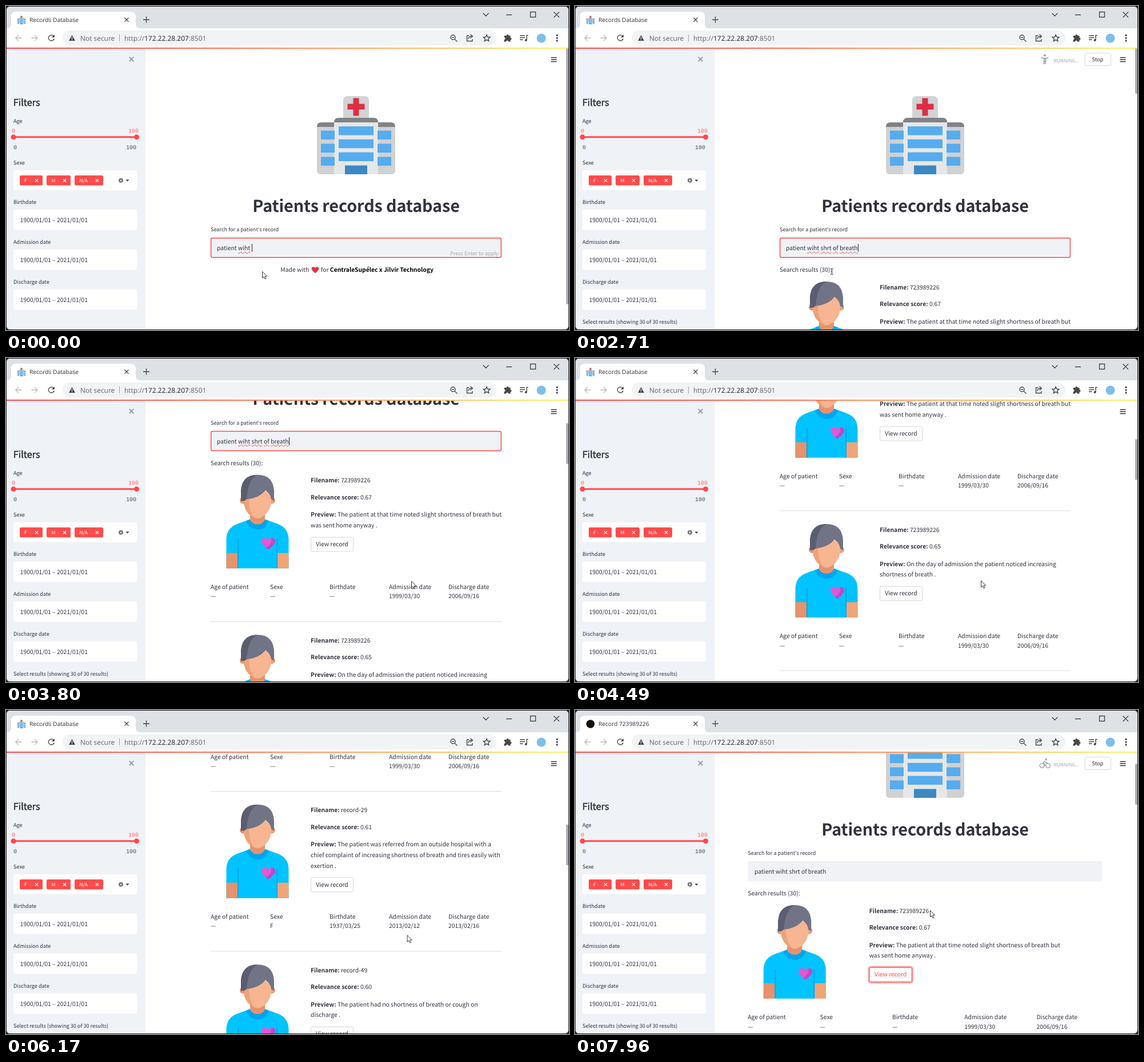
Write an HTML page that moves like this. It is 985x568 px and loops after 8000 ms.

```html
<!DOCTYPE html>
<html lang="en">
<head>
<meta charset="utf-8">
<title>Records Database</title>
<style>
@property --y { syntax: "<number>"; inherits: true; initial-value: 0; }
html, body { margin: 0; width: 100%; height: 100%; overflow: hidden; background: #25252d; }
svg { display: block; }
#stage {
  --y: 0;
  font: 10.35px "Noto Sans CJK JP", "Noto Sans CJK SC", "Noto Sans", sans-serif;
  fill: #31333f;
  text-rendering: geometricPrecision;
  animation: scroll 8s linear infinite;
}
#page { transform: translateY(calc(var(--y) * -1px)); }
.thumb { fill: #a9abb0; transform: translateY(calc(var(--y) * .144px)); }
#pointer { animation: point 8s linear infinite; }
.b { font-weight: 700; }
.semi { stroke: #31333f; stroke-width: .5; }
.small { font-size: 9.13px; }
.tag { font-size: 8.6px; font-weight: 500; fill: #fff; }
.mono { font: 10.1px "Liberation Mono", monospace; opacity: .85; }
.ui { font-family: "Open Sans", "Noto Sans", sans-serif; }
.red { fill: #ff4b4b; }
.line { fill: none; stroke: #45484d; stroke-width: 1.4; }
.typed { font: 10.35px/20px "Noto Sans CJK JP", "Noto Sans CJK SC", "Noto Sans", sans-serif; color: #31333f; white-space: pre; }
.typed u { text-decoration: underline wavy #e5473f .6px; text-underline-offset: 1.5px; text-decoration-skip-ink: none; }
.typed i { display: inline-block; width: 1px; height: 14px; margin-right: -1px; vertical-align: -3px; background: #222; }
@keyframes scroll {
  0%, 39% { --y: 0; }
  47.5% { --y: 278; }
  53.625%, 54.5% { --y: 378; }
  55.25% { --y: 420; }
  56.125% { --y: 472; }
  59.5%, 63% { --y: 566; }
  67.125% { --y: 843; }
  73%, 76.5% { --y: 945; }
  83.25% { --y: 236; }
  86.75%, 100% { --y: 141; }
}
@keyframes point {
  0%, 34.5% { transform: translate(448px, 465px); }
  41% { transform: translate(700px, 394px); }
  47.5% { transform: translate(709px, 391px); }
  56%, 74% { transform: translate(710px, 390px); }
  83.25% { transform: translate(685px, 403px); }
  86.75% { transform: translate(670px, 413px); }
  91%, 93.5% { transform: translate(572px, 466px); }
  99.4%, 100% { transform: translate(621px, 351px); }
}
</style>
</head>
<body>
<svg id="stage" width="985" height="568" viewBox="0 0 985 568">
  <defs>
    <linearGradient id="rainbow"><stop stop-color="#ff4b4b"/><stop offset=".35" stop-color="#ff6a58"/><stop offset="1" stop-color="#fff36b"/></linearGradient>
    <clipPath id="window"><rect x="1" y="1" width="983" height="566" rx="6"/></clipPath>
    <clipPath id="view"><rect x="244" y="74.5" width="740" height="492.5"/></clipPath>
    <g id="hospital">
      <path fill="#d1d3d4" d="M46 50V8q0-8 8-8h29q8 0 8 8v42z"/>
      <path fill="#dd2e44" d="M63.500 3.500h10v10h10v10h-10v11h-10v-11h-10v-10h10z"/>
      <path fill="#cfd1d3" d="M0 53h137v77q0 7-7 7H7q-7 0-7-7z"/>
      <path fill="#808285" d="M0 54q0-8 8-8h121q8 0 8 8z"/>
      <path fill="#e6e7e8" d="M30 46h77v91H30z"/>
      <path fill="#808285" d="M30 46q0-8 8-8h61q8 0 8 8z"/>
      <path fill="#55acee" d="M7 60.500h24v15.500H7zm0 23h24V99H7zm0 23h24V122H7zM106 60.500h24v15.500h-24zm0 23h24V99h-24zm0 23h24V122h-24zM38 53h61v15.500H38zm0 22.700h61v15.500H38zm0 22.700h61V114H38z"/>
      <path fill="#3b88c3" d="M49 121.500h39V137H49z"/>
    </g>
    <g id="avatar">
      <path fill="#00c3ff" d="M-54.500 164v-50Q-54.500 93-35 86L-13 78h26L35 86Q54.500 93 54.500 114v50z"/>
      <path fill="#00a4ef" d="M-20 81L-13 78h26l7 3Q14 96 0 96T-20 81zM-35 112h2v52h-2zM33 112h2v52h-2z"/>
      <path fill="#e5936c" d="M-54.500 137h19.500v27h-19.500zM-13 58h26v21Q9 87 0 87T-13 79z"/>
      <path fill="#f0a577" d="M35 137h19.500v27H35z"/>
      <circle cx="-25" cy="45" r="6" fill="#e8956d"/>
      <circle cx="25" cy="45" r="6" fill="#f0a073"/>
      <path fill="#f7b591" d="M-24 28h48v20Q22 66 8 74Q0 79-8 74Q-22 66-24 48z"/>
      <path fill="#eda27a" d="M-24 30h9v18Q-13 68-4 76Q-22 69-24 48z"/>
      <path fill="#707486" d="M-29 46V28Q-27 0 0 0T29 28V46L24 43Q23 33 14 27Q3 41-20 43L-24 46z"/>
      <path fill="#5a5e70" d="M-29 46V28Q-27 0 0 0Q-17 8-19 43L-24 46z"/>
      <path fill="#e457d0" d="M19 131Q3 119 8 113Q14 108 19 114Q24 108 30 113Q35 119 19 131z"/>
      <path fill="#b84bcb" d="M19 131Q35 119 30 113Q27 110 24 111Q26 121 15 128z"/>
    </g>
  </defs>

  <rect width="985" height="568" fill="#25252d"/>
  <g clip-path="url(#window)">
    <rect width="985" height="568" fill="#fff"/>

    <!-- browser frame -->
    <rect width="985" height="39" fill="#dee1e6"/>
    <path fill="#fff" d="M2 39q7 0 7-7V18q0-8 8-8h202q8 0 8 8v14q0 7 7 7z"/>
    <g data-on="0-7750">
      <use href="#hospital" transform="translate(19.500 17) scale(.11)"/>
      <text class="ui" x="41" y="28" font-size="10.250">Records Database</text>
    </g>
    <g data-on="7750-8000">
      <circle cx="27" cy="24.500" r="7.300" fill="#111"/>
      <text class="ui" x="41" y="28" font-size="10.250">Record 723989226</text>
    </g>
    <path class="line" d="M207.500 20.500l7 7m0-7l-7 7M240 24h11m-5.500-5.500v11"/>
    <path class="line" stroke-width="1.100" d="M834.500 12.500l5 5 5-5M875 15.500h10M917.500 10.500h9v9h-9zM958.500 10.500l9.500 9.500m0-9.500l-9.500 9.500"/>
    <path class="line" style="stroke:#b8bbbf" d="M27.500 56H17m5-5l-5 5 5 5M44.500 56H55m-5-5l5 5-5 5"/>
    <path class="line" d="M83 52.500a5 5 0 1 0 1.200 4.500"/>
    <path fill="#45484d" d="M85 50v5h-5z"/>
    <rect x="99" y="43" width="759" height="26" rx="13" fill="#f1f3f4"/>
    <path fill="#45484d" d="M115.500 51l5.500 10h-11z"/>
    <path stroke="#fff" stroke-width="1.200" d="M115.500 54.500v3m0 1v1.200"/>
    <g class="ui" font-size="11.950" fill="#5f6368">
      <text x="130" y="60.500">Not secure</text>
      <path stroke="#9aa0a6" d="M198.500 50v12"/>
      <text x="207" y="60.500">http://<tspan fill="#202124">172.22.28.207</tspan>:8501</text>
    </g>
    <g class="line" stroke-width="1.300">
      <circle cx="782" cy="55" r="4"/><path d="M785 58l4.500 4.500M780 55h4"/>
      <path d="M810 52h-3.500v9.500h9.500V58M809 58q0-5 6-5m-2.500-3l4 3-4 3.500"/>
      <path d="M841 50.500l1.700 3.800 4.200.4-3.200 2.800 1 4-3.700-2.200-3.700 2.200 1-4-3.200-2.800 4.200-.4z"/>
      <path d="M899 52h9m-9 3.500h9m-9 3.500h5.500M911 60v-8.500h2.500"/>
    </g>
    <circle cx="909.500" cy="60" r="2" fill="#45484d"/>
    <path fill="#45484d" d="M872 52h3.500a2 2 0 1 1 4 0h3v3.500a2 2 0 1 1 0 4V62.500H879a2 2 0 0 0-4 0h-3.500V59a2 2 0 0 0 0-4z"/>
    <circle cx="936.500" cy="56.500" r="8" fill="#7cbfe9"/>
    <path fill="#45484d" d="M962.500 50h3v3h-3zm0 4.700h3v3h-3zm0 4.700h3v3h-3z"/>

    <!-- sidebar -->
    <rect y="74" width="244" height="494" fill="#eff2f7"/>
    <path class="line" style="stroke:#9da0a8;stroke-width:2" d="M215.800 89.500l7.500 7.500m0-7.500l-7.500 7.500"/>
    <text class="semi" x="12.700" y="175" font-size="16.300">Filters</text>
    <text class="small" x="13" y="205">Age</text>
    <g class="mono">
      <text class="red" x="10" y="221.500">0</text><text class="red" x="214" y="221.500">100</text>
      <text x="13" y="250.500">0</text><text x="210" y="250.500">100</text>
    </g>
    <path stroke="#ff4b4b" stroke-width="3" d="M13 229.700h215.500"/>
    <circle class="red" cx="13" cy="229.700" r="4.500"/><circle class="red" cx="228.500" cy="229.700" r="4.500"/>
    <text class="small" x="13" y="278">Sexe</text>
    <rect x="13" y="288" width="216" height="35" rx="3" fill="#fff"/>
    <g id="tags"></g>
    <circle cx="201" cy="305.800" r="4" fill="#74767f"/>
    <path stroke="#fff" d="M199.500 304.300l3 3m0-3l-3 3"/>
    <path d="M209.500 304.500h6l-3 3.200z"/>
    <g id="dates"></g>
    <text class="small" data-on="1880-8000" x="13" y="556.500">Select results (showing 30 of 30 results)</text>

    <!-- scrolling page -->
    <g clip-path="url(#view)"><g id="page"></g></g>

    <rect y="73" width="985" height="2" fill="url(#rainbow)"/>
    <path class="line" style="stroke:#31333f" d="M953.500 90.500h10m-10 3.500h10m-10 3.500h10"/>
    <g data-on="1340-2780 7820-8000">
      <g id="poses" fill="none" stroke="#9a9ca3" stroke-width="1.700">
        <g><circle cx="825" cy="87" r="1.200"/><path d="M817 92l4-2h3l-2 5 3 3-2 4m-1-7l-2 4h-4m8-9l2 3h3"/></g>
        <g><circle cx="822" cy="86.500" r="1.200"/><path d="M815.500 90.500l4.500 1h4l4.500-1M820.700 91v11m2.600-11v11M820.700 97h2.600"/></g>
        <g stroke-width="1.300"><circle cx="817" cy="97.500" r="3.800"/><circle cx="827.500" cy="97.500" r="3.800"/><circle cx="824" cy="86.500" r="1.200"/><path d="M827 93h-3l-2-3-3 2.500 3 2.500v4"/></g>
      </g>
      <text x="837.500" y="99" font-size="8.400" fill="#a5a7ae">RUNNING...</text>
      <rect x="892" y="82.500" width="45.500" height="22" rx="2.500" fill="#fff" stroke="#d6d7db"/>
      <text class="small" x="904.500" y="97">Stop</text>
    </g>
    <rect class="thumb" data-on="0-1880" x="980" y="74" width="4" height="449" rx="2"/>
    <rect class="thumb" data-on="1880-2780" x="980" y="74" width="4" height="80" rx="2"/>
    <rect class="thumb" data-on="2780-8000" x="980" y="74" width="4" height="72" rx="2"/>
  </g>

  <g id="pointer">
    <path data-on="0-1880 2780-8000" fill="#fff" stroke="#222" stroke-width=".9" d="M.500.500V12l2.700-2.500 2 4.300 1.900-.9-2-4.100h3.600z"/>
    <path data-on="1880-2780" fill="none" stroke="#222" d="M-1-4.500h1.500l1 1 1-1H4M1.500-3.500v8M-1 5.500h1.500l1-1 1 1H4"/>
  </g>
</svg>

<script>
const LOOP = 8000;
const PHRASE = "patient wiht shrt of breath";
const START = 13;
const $ = id => document.getElementById(id);

const text = (x, y, s, cls = "") => `<text x="${x}" y="${y}" class="${cls}">${s}</text>`;
const bold = s => `<tspan class="b">${s}</tspan>`;

const records = [
  ["723989226", "0.67", ["The patient at that time noted slight shortness of breath but", "was sent home anyway ."],
    ["—", "—", "—", "1999/03/30", "2006/09/16"]],
  ["723989226", "0.65", ["On the day of admission the patient noticed increasing", "shortness of breath ."],
    ["—", "—", "—", "1999/03/30", "2006/09/16"]],
  ["record-29", "0.61", ["The patient was referred from an outside hospital with a", "chief complaint of increasing shortness of breath and tires easily with", "exertion ."],
    ["—", "F", "1937/03/25", "2013/02/12", "2013/02/16"]],
  ["record-49", "0.60", ["The patient had no shortness of breath or cough on", "discharge ."],
    ["—", "M", "1951/08/04", "2012/05/19", "2012/05/23"]],
];
const fields = ["Age of patient", "Sexe", "Birthdate", "Admission date", "Discharge date"];

function button(x, y, state = "") {
  const hot = state !== "";
  const ring = state === "focus"
    ? `<rect x="${x - 1}" y="${y - 1}" width="77" height="28" rx="4" fill="none" stroke="#ff4b4b" stroke-opacity=".5" stroke-width="2.500"/>` : "";
  return ring +
    `<rect x="${x + .5}" y="${y + .5}" width="74" height="25" rx="2.500" fill="#fff" stroke="${hot ? "#ff4b4b" : "#d6d7db"}"/>` +
    text(x + 9.3, y + 16.3, "View record", hot ? "red" : "");
}

function record([file, score, lines, values], i, { left, width, pitch, tx }) {
  const y = 496.5 + 280.4 * i;
  const buttonY = y + 58 + 18.7 * lines.length;
  return `<use href="#avatar" x="${left + 82}" y="${y - 13.5}" data-on="2710-8000"/>` +
    text(tx, y, bold("Filename:") + " " + file) +
    text(tx, y + 29.7, bold("Relevance score:") + " " + score) +
    lines.map((s, n) => text(tx, y + 60 + 18.7 * n, n ? s : bold("Preview:") + " " + s)).join("") +
    button(tx, buttonY) +
    fields.map((f, n) => text(left + pitch * n, y + 186.7, f) + text(left + pitch * n, y + 203, values[n])).join("") +
    `<path stroke="#d9dade" d="M${left} ${y + 243.7}h${width}"/>`;
}

const results = layout =>
  text(layout.left, 466, "Search results (30):") +
  records.map((r, i) => record(r, i, layout)).join("");

const search = ({ left, width }) =>
  text(left, 395, "Search for a patient's record", "small") +
  `<rect x="${left}" y="406" width="${width}" height="35.500" rx="3" fill="#f0f2f6"/>`;

const narrow = { left: 358, width: 509, pitch: 104, tx: 533 };
const wide = { left: 302.3, width: 619.7, pitch: 126.3, tx: 514.7 };

$("page").innerHTML = `
  <use href="#hospital" x="544" y="158"/>
  <text class="b" x="612.500" y="360.500" font-size="28.750" letter-spacing="-.1" text-anchor="middle">Patients records database</text>
  <g data-on="0-7820">
    ${search(narrow)}
    <rect data-on="0-7400" x="358.700" y="406.700" width="507.600" height="34" rx="2.500" fill="none" stroke="#ff4b4b" stroke-width="1.500"/>
    <foreignObject x="369" y="413.500" width="300" height="22"><div class="typed" id="typed"></div></foreignObject>
    <text data-on="0-1340" x="861.500" y="437" font-size="9.130" fill="#a3a5ac" text-anchor="end">Press Enter to apply</text>
  </g>
  <g data-on="0-1880">
    ${text(480.3, 466, "Made with")}
    <path fill="#e8323f" d="M541 468.500Q532 461.500 535.500 458Q538.500 456 541 459Q543.500 456 546.500 458Q550 461.500 541 468.500z"/>
    <text x="551" y="466">for <tspan class="b" fill="#000">CentraleSupélec x Jilvir Technology</tspan></text>
  </g>
  <g data-on="1880-7820">
    ${results(narrow)}
    <g data-on="7250-7400">${button(533, 592, "hover")}</g>
    <g data-on="7400-7820">${button(533, 592, "focus")}</g>
  </g>
  <g data-on="7820-8000">
    ${search(wide)}${text(314, 428, PHRASE)}
    ${results(wide)}${button(wide.tx, 592, "focus")}
  </g>`;

$("tags").innerHTML = [["F", 24, 40, 8], ["M", 71, 42, 8.5], ["N/A", 120, 50, 8.5]].map(([s, x, w, pad]) =>
  `<rect class="red" x="${x}" y="297" width="${w}" height="17.500" rx="2.500"/>` + text(x + pad, 309, s, "tag") +
  `<path stroke="#fff" stroke-width="1.300" d="M${x + w - 13} 303.200l5 5m0-5l-5 5"/>`).join("");

$("dates").innerHTML = ["Birthdate", "Admission date", "Discharge date"].map((s, i) => {
  const y = 347 + 69.8 * i;
  return text(13, y, s, "small") +
    `<rect x="13" y="${y + 10}" width="216" height="35.800" rx="3" fill="#fff"/>` +
    text(24.8, y + 32, "1900/01/01 – 2021/01/01");
}).join("");

// Elements with data-on="from-to ..." are shown only in those spans of the loop.
const timed = [...document.querySelectorAll("[data-on]")].map(el => ({
  el, spans: el.dataset.on.split(" ").map(s => s.split("-").map(Number)),
}));
const poses = [...$("poses").children];
const show = (el, on) => { el.style.display = on ? "" : "none"; };

function keystrokes(t) {
  if (t < 70) return 0;
  if (t < 940) return Math.min(11, Math.floor((t - 70) / 80) + 1);
  return 11 + Math.min(3, Math.floor((t - 940) / 100) + 1);
}

function typedHtml(t) {
  const words = PHRASE.slice(0, START + keystrokes(t)).split(" ");
  if (t >= 7400) return words.join(" ");
  const last = words.length - 1;
  return words.map((w, i) => i && (i < last || t >= 1340) ? `<u>${w}</u>` : w).join(" ") + "<i></i>";
}

let start, shown;
function tick(now) {
  start ??= now;
  const t = (now - start) % LOOP;
  for (const { el, spans } of timed) show(el, spans.some(([a, b]) => t >= a && t < b));
  const pose = Math.floor(t % 800 / 800 * poses.length);
  poses.forEach((p, i) => show(p, i === pose));
  const html = typedHtml(t);
  if (html !== shown) $("typed").innerHTML = shown = html;
  requestAnimationFrame(tick);
}
requestAnimationFrame(tick);
</script>
</body>
</html>
```
